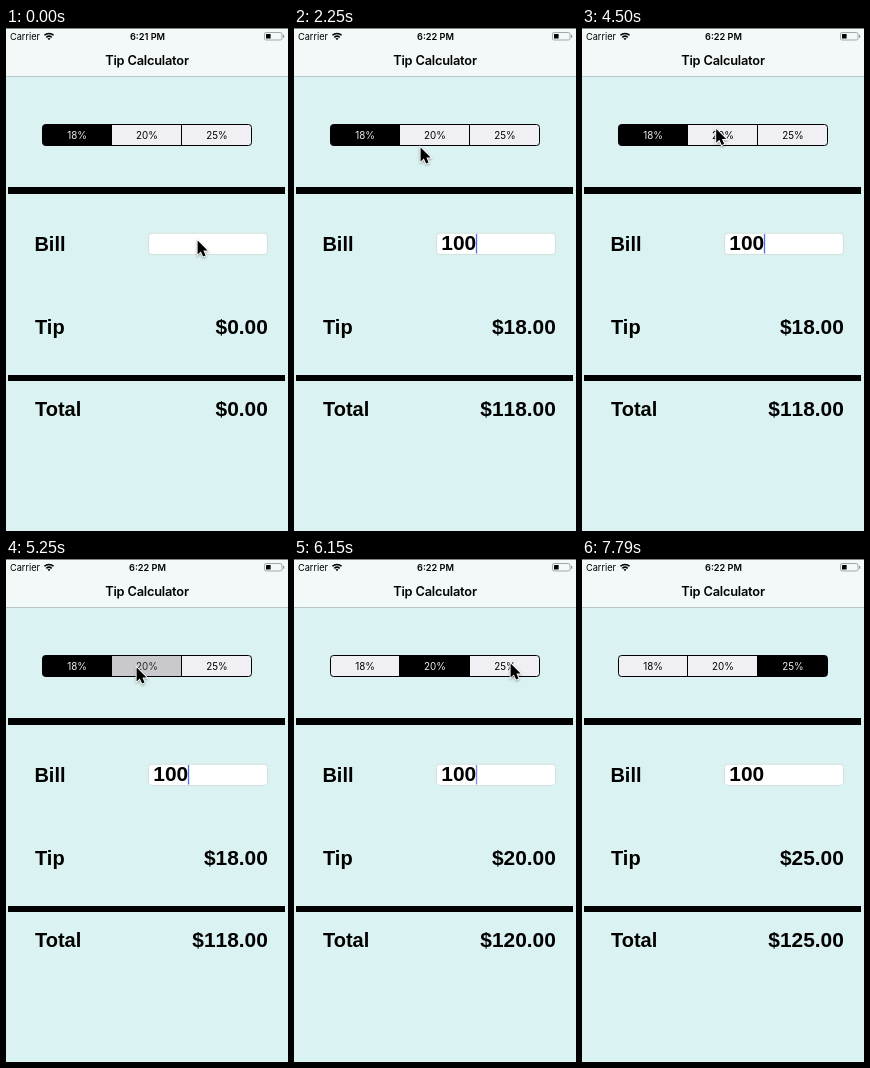
Animation of 282 by 503 pixels, one loop 8 s. Source, as an HTML page:

```html
<!DOCTYPE html>
<html lang="en">
<head>
<meta charset="utf-8">
<title>Tip Calculator</title>
<style>
  html, body { margin: 0; width: 100%; height: 100%; overflow: hidden; background: #daf3f2; }
  svg { display: block; width: 282px; height: 503px; }
  text { font-family: Inter, Roboto, sans-serif; }
  .status { font-size: 9.2px; }
  .title { font-size: 12.8px; font-weight: 600; letter-spacing: -.2px; }
  #segs text { font-size: 9.8px; text-anchor: middle; }
  .big text { font: bold 20px "Liberation Sans", Arial, sans-serif; }
  .big .num { font-size: 20.9px; font-kerning: none; }
  .end { text-anchor: end; }
  .mid { text-anchor: middle; }
  #cursor { filter: drop-shadow(0 1px 1px rgba(0, 0, 0, .35)); }
</style>
</head>
<body>
<svg viewBox="0 0 282 503">
  <rect width="282" height="503" fill="#daf3f2"/>

  <rect width="282" height="48" fill="#f3f8f8"/>
  <rect y="48" width="282" height="1" fill="#b9c6c6"/>
  <rect width="282" height=".7" fill="#555"/>
  <text class="status" x="4" y="11.5">Carrier</text>
  <g fill="none" stroke="#000" stroke-width="1.6">
    <path d="M38.4 7.3a6.6 6.6 0 0 1 9.2 0M40.3 9.3a4 4 0 0 1 5.4 0"/>
    <path d="M43 12.2l-1.5-1.6a2.2 2.2 0 0 1 3 0z" fill="#000" stroke="none"/>
  </g>
  <text id="clock" class="status mid" x="141.5" y="11.5" font-weight="600"></text>
  <rect x="258.5" y="4.5" width="17.5" height="7.5" rx="1.6" fill="none" stroke="#8d9292" stroke-width=".8"/>
  <rect x="260" y="6" width="4.6" height="4.6" rx=".5"/>
  <rect x="277" y="6.8" width="1.2" height="3" rx=".6" fill="#8d9292"/>
  <text class="title mid" x="141" y="36.6">Tip Calculator</text>

  <clipPath id="round"><rect x="36.5" y="96.5" width="209" height="21" rx="3"/></clipPath>
  <g id="segs" clip-path="url(#round)"></g>
  <path d="M105.5 97v20.5M175.5 97v20.5" stroke="#000"/>
  <rect x="36.5" y="96.5" width="209" height="21" rx="3" fill="none" stroke="#000"/>

  <path d="M2 159H279V166H2zM2 347H279V353H2z"/>
  <rect x="142.5" y="205.2" width="119" height="21.3" rx="3.5" fill="#fff" stroke="#cfd9d9" stroke-width=".8"/>

  <g class="big">
    <text x="28.4" y="223">Bill</text>
    <text x="29" y="305.5">Tip</text>
    <text x="29" y="388">Total</text>
    <text id="bill" class="num" x="147.3" y="222.3"></text>
    <text id="tip" class="num end" x="261.8" y="305.5"></text>
    <text id="total" class="num end" x="261.8" y="388"></text>
  </g>

  <rect id="caret" y="206" width="1.3" height="19.5" fill="#4f73e4"/>
  <path id="cursor" d="M.6 .6V14.4L3.8 11.4L6.1 16.6L8.6 15.5L6.4 10.5H10.6Z"
        stroke="#fff" stroke-width="1.9" paint-order="stroke"/>
</svg>

<script>
const LOOP = 8000, STEP = 150, BLINK = 995;
const RATES = [18, 20, 25];
const $ = id => document.getElementById(id);
const clamp = (v, lo = 0, hi = 1) => Math.min(hi, Math.max(lo, v));
const ease = v => v * v * (3 - 2 * v);
const money = n => '$' + n.toFixed(2);

// Pointer glides from where it is to (x, y)
const glides = [
  { from: 1500, to: 2250, x: 126, y: 119 },
  { from: 4050, to: 4650, x: 135, y: 97 },
  { from: 4950, to: 5100, x: 130, y: 108 },
  { from: 5550, to: 5900, x: 216, y: 104 },
  { from: 7050, to: 7650, x: 91, y: 62 }
];
const taps = [
  { seg: 1, down: 5250, up: 5400 },
  { seg: 2, down: 6450, up: 6750 }
];

function pointer(t) {
  let x = 191, y = 212;
  for (const g of glides) {
    const k = ease(clamp((t - g.from) / (g.to - g.from)));
    x += (g.x - x) * k;
    y += (g.y - y) * k;
  }
  return [x, y];
}

// Steady while typing, then fading out and in around the middle of each blink
function caretAlpha(t) {
  if (t < 2400) return t < 150 ? 0 : 1;
  const phase = (t - 2925) / BLINK;
  const gap = Math.abs(phase - Math.round(phase)) * BLINK;
  return clamp((gap - 160) / 100);
}

// 0 is a plain segment, 1 a selected one
function segLevels(t) {
  let levels = [1, 0, 0];
  for (const { seg, down, up } of taps) {
    if (t < down) continue;
    const fading = t < up + STEP;
    levels = levels.map((level, i) => {
      if (t < up) return i === seg ? .16 : level;
      return i === seg ? (fading ? .6 : 1) : (fading ? level * .46 : 0);
    });
  }
  return levels;
}

const grey = k => `rgb(${[239, 239, 244].map(c => Math.round(c * k))})`;

function add(tag, attrs) {
  const el = document.createElementNS('http://www.w3.org/2000/svg', tag);
  for (const key in attrs) el.setAttribute(key, attrs[key]);
  return $('segs').appendChild(el);
}

const segs = RATES.map((rate, i) => {
  const x = 35.5 + 70 * i;
  const box = add('rect', { x, y: 96, width: 70, height: 22 });
  const label = add('text', { x: x + 35.5, y: 110.7 });
  label.textContent = rate + '%';
  return { box, label };
});

function draw(t) {
  const bill = '100'.slice(0, clamp(Math.floor((t - 150) / 300), 0, 3));
  const picked = taps.findLast(tap => t >= tap.up)?.seg ?? 0;
  const tip = bill * RATES[picked] / 100;
  $('clock').textContent = t < 150 ? '6:21 PM' : '6:22 PM';
  $('bill').textContent = bill;
  $('tip').textContent = money(tip);
  $('total').textContent = money(+bill + tip);

  $('caret').setAttribute('x', 147 + 11.62 * bill.length);
  $('caret').setAttribute('opacity', caretAlpha(t));
  $('cursor').setAttribute('transform', `translate(${pointer(t)})`);
  $('cursor').setAttribute('opacity', t < 7800 ? 1 : 0);

  segLevels(t).forEach((level, i) => {
    segs[i].box.setAttribute('fill', grey(1 - level));
    segs[i].label.setAttribute('fill', grey(level));
  });
}

const start = performance.now();
function tick() {
  const t = (performance.now() - start) % LOOP;
  // The picture advances in steps; the last one comes slightly early.
  draw(Math.floor((t + 10) / STEP) * STEP);
  requestAnimationFrame(tick);
}
tick();
</script>
</body>
</html>
```
